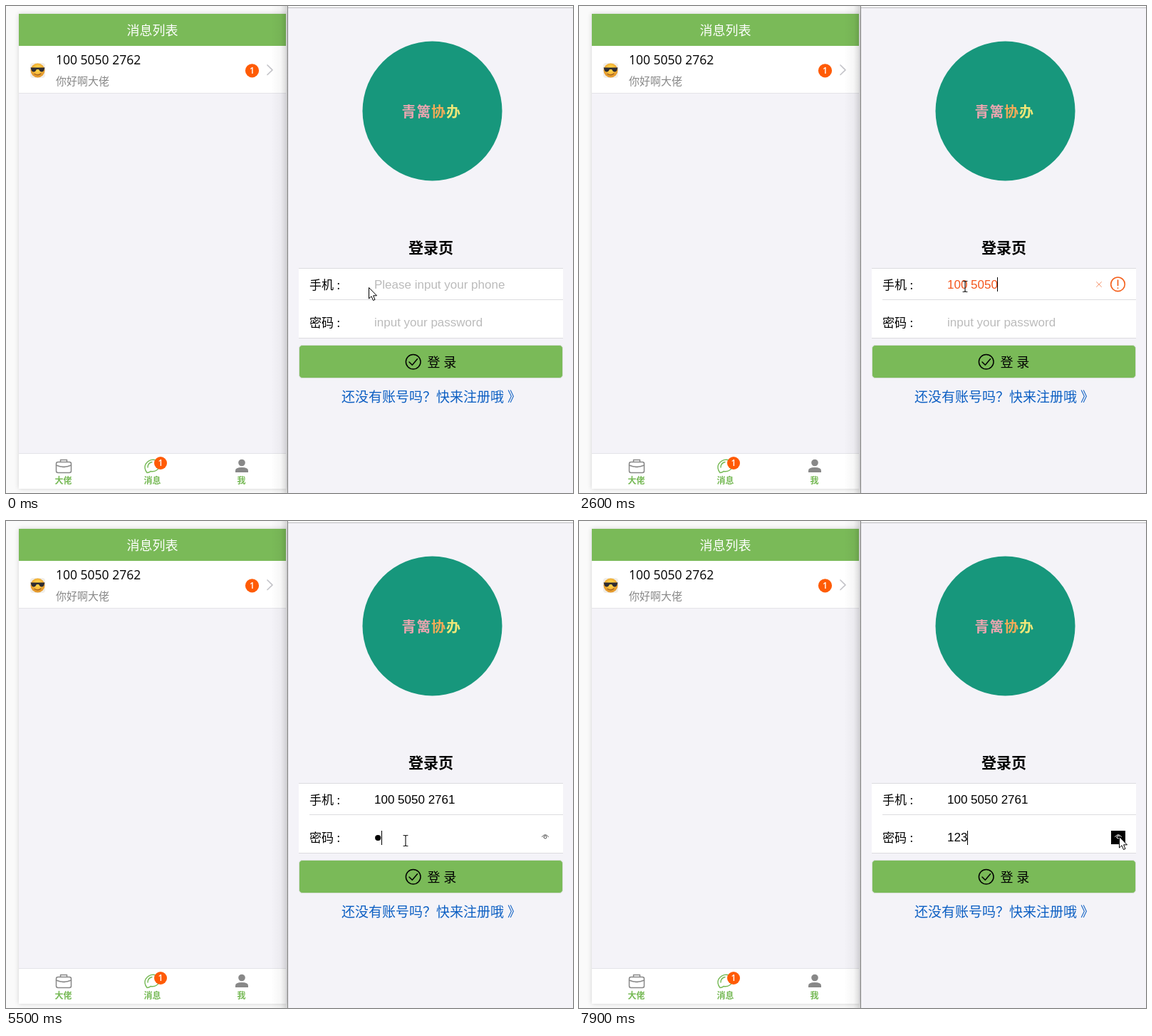
An HTML page that plays this animation: 796 px wide and 684 px high, repeating every 8 s.

```html
<!DOCTYPE html>
<html lang="zh-CN">
<head>
<meta charset="utf-8">
<title>登录页</title>
<style>
html, body { margin: 0; width: 100%; height: 100%; overflow: hidden; background: #fafafa; }
svg { display: block; width: 796px; height: 684px; }
text { font-family: "Open Sans", "Noto Sans CJK SC", "Noto Sans CJK", sans-serif; white-space: pre; }
.field { font: 17px "Liberation Sans", Arial, sans-serif; }
.hint { fill: #bbb; }
.mid { text-anchor: middle; }
.tab { font-size: 12px; font-weight: 700; fill: #76b955; }
.badge { font-size: 12px; fill: #fff; font-weight: 600; }
.line { fill: none; stroke-linecap: round; stroke-linejoin: round; }
</style>
</head>
<body>
<svg viewBox="0 0 796 684">
  <defs>
    <linearGradient id="shade">
      <stop offset="0" stop-opacity="0"/>
      <stop offset=".6" stop-opacity=".035"/>
      <stop offset="1" stop-opacity=".16"/>
    </linearGradient>
    <radialGradient id="face" cy=".4">
      <stop offset=".4" stop-color="#ffce45"/>
      <stop offset="1" stop-color="#e59a2c"/>
    </radialGradient>
    <filter id="soft" x="-10%" y="-10%" width="120%" height="120%">
      <feDropShadow dx="0" dy="0" stdDeviation="3" flood-opacity=".16"/>
    </filter>
  </defs>

  <!-- message list -->
  <rect width="796" height="684" fill="#fafafa"/>
  <rect x="18" y="11" width="376" height="667" fill="#f4f3f8" filter="url(#soft)"/>
  <rect x="18" y="11" width="375" height="45" fill="#7aba58"/>
  <text class="mid" x="205.5" y="41" font-size="18" fill="#fff">消息列表</text>
  <rect x="18" y="56" width="375" height="66.5" fill="#fff"/>
  <path d="M18 122.5H393M18 628.5H393" stroke="#e4e4e8"/>
  <rect x="34" y="80" width="21" height="21" rx="4" fill="#f1eee8"/>
  <circle cx="44.5" cy="90.5" r="10" fill="url(#face)"/>
  <path d="M34.5 86.5H54.5L53 91Q49 95 46 89H43Q40 95 36 91Z" fill="#2d2c33"/>
  <path class="line" d="M40 95.5Q45 98.5 49 95" stroke="#9a5a20" stroke-width="1.2"/>
  <text x="70" y="82" font-size="17.5">100 5050 2762</text>
  <text x="70" y="111" font-size="15" fill="#888">你好啊大佬</text>
  <circle cx="345.5" cy="90.8" r="9.6" fill="#ff5b05"/>
  <text class="badge mid" x="345.5" y="95.2">1</text>
  <path class="line" d="M367 83L374 89.8L367 96.5" stroke="#c4c4c9" stroke-width="1.7"/>

  <!-- tab bar -->
  <rect x="18" y="629" width="375" height="49" fill="#fff"/>
  <g class="line" stroke="#888" stroke-width="1.5">
    <rect x="70.5" y="640.5" width="21" height="15" rx="2.5"/>
    <path d="M76.5 640V637.5H85.5V640M70.5 645Q81 649.5 91.5 645M79 647.5H83"/>
  </g>
  <path class="line" d="M198 655.5Q193 649 196 643.5Q201 636 209 637.5Q217 640 215 648Q211 655 203 653.5Q201 655.5 198 655.5ZM199 648Q199 642 205 640.5" stroke="#76b955" stroke-width="1.4"/>
  <circle cx="217" cy="642" r="9" fill="#ff5b05"/>
  <text class="badge mid" x="217" y="646.3">1</text>
  <circle cx="331" cy="641.5" r="4.8" fill="#888"/>
  <path d="M322 655V652.5Q322 648 331 648T340 652.5V655Z" fill="#888"/>
  <text class="tab mid" x="80.5" y="670.7">大佬</text>
  <text class="tab mid" x="205.5" y="670.7">消息</text>
  <text class="tab mid" x="330.5" y="670.7">我</text>
  <rect x="372" width="23" height="684" fill="url(#shade)"/>

  <!-- login window -->
  <rect x="395" width="401" height="684" fill="#f4f3f8"/>
  <rect x="396" width="400" height="2" fill="#fafafa"/>
  <path d="M396 2.5H796" stroke="#bcbcbf"/>
  <path d="M395.5 0V684" stroke="#858585"/>
  <circle cx="598.5" cy="147.5" r="98" fill="#17977c"/>
  <text y="155.5" font-size="20" font-weight="700"><tspan x="555.5" fill="#eca5b0">青</tspan><tspan x="576.5" fill="#eca5b0">篱</tspan><tspan x="597" fill="#f4ab58">协</tspan><tspan x="618" fill="#efe778">办</tspan></text>
  <text class="mid" x="596.5" y="347" font-size="21" font-weight="700">登录页</text>
  <rect x="411" y="368" width="371" height="99" fill="#fff"/>
  <path d="M411 368.5H782M426 412.5H782M411 466.5H782" stroke="#dcdcdf"/>
  <text x="426" y="397.5" font-size="17">手机 :</text>
  <text x="426" y="450.5" font-size="17">密码 :</text>
  <rect x="411.5" y="476.5" width="370" height="46" rx="4.5" fill="#7aba58" stroke="#d5dfd3"/>
  <circle class="line" cx="571.7" cy="499.8" r="10.3" stroke="#000" stroke-width="1.5"/>
  <path class="line" d="M566 500L570.3 504.3L577.5 495.7" stroke="#000" stroke-width="1.5"/>
  <text x="591.5" y="506.5" font-size="18">登 录</text>
  <text x="471" y="556" font-size="19" fill="#0c5fc3">还没有账号吗？快来注册哦 》</text>

  <!-- live parts -->
  <text id="phone" class="field" x="517" y="397"></text>
  <text id="pass" class="field" x="517" y="450"></text>
  <g id="dots"><circle cx="522.2" cy="445" r="4.1"/><circle cx="532.5" cy="445" r="4.1"/><circle cx="542.8" cy="445" r="4.1"/></g>
  <path id="clear" class="line" d="M-3.5 -3.5L3.5 3.5M3.5 -3.5L-3.5 3.5"/>
  <g id="error">
    <circle class="line" cx="756.5" cy="390.8" r="9.8" stroke="#f4611d" stroke-width="1.6"/>
    <path class="line" d="M756.5 385V392.5M756.5 396V396.3" stroke="#f4611d" stroke-width="1.7"/>
  </g>
  <g id="eye">
    <rect id="eyeBox" x="747" y="435" width="20" height="19"/>
    <path id="eyeLine" class="line" d="M752.5 443.5Q757 437.5 761.5 443.5M755 444A2 2 0 1 0 759 444A2 2 0 1 0 755 444"/>
  </g>
  <path id="caret" d="M0 0V20" stroke="#000"/>
  <path id="arrow" d="M.5 .5V16L4 12.7L6.5 18.5L9 17.4L6.6 11.8H11.5Z" fill="#fff" stroke="#000"/>
  <path id="beam" class="line" d="M-3 -7.5H-1L0 -6.5L1 -7.5H3M0 -6.5V6.5M-3 7.5H-1L0 6.5L1 7.5H3" stroke="#222" stroke-width="1.2"/>
</svg>
<script>
const $ = id => document.getElementById(id);
const LOOP = 8000, BLINK = 530;
const number = "10050502761", secret = "123";
const phoneKeys = [1300, 1500, 1700, 1900, 2100, 2300, 2500, 2900, 3200, 3500, 3700];
const passKeys = [5500, 5650, 5800];
const focusPhone = 600, focusPass = 4700, reveal = 7600;
const resets = [focusPhone, ...phoneKeys, focusPass, ...passKeys, reveal];
const path = [
  [0, 509, 395], [100, 509, 395], [400, 542, 394], [4100, 542, 394], [4500, 561, 449],
  [6500, 561, 449], [6900, 662, 472], [7150, 705, 484], [7450, 758, 443], [8000, 758, 443]
];

const show = (id, on) => $(id).style.display = on ? "" : "none";
const place = (id, x, y) => $(id).setAttribute("transform", `translate(${x} ${y})`);
const count = (keys, t) => keys.filter(k => k <= t).length;
const format = s => [s.slice(0, 3), s.slice(3, 7), s.slice(7)].filter(Boolean).join(" ");

function mouse(t) {
  const i = path.findIndex(p => p[0] > t);
  const [t0, x0, y0] = path[i - 1], [t1, x1, y1] = path[i];
  const u = (t - t0) / (t1 - t0);
  return [x0 + (x1 - x0) * u, y0 + (y1 - y0) * u];
}

function fill(id, value, hint, color) {
  const el = $(id);
  if (el.textContent !== (value || hint)) el.textContent = value || hint;
  el.classList.toggle("hint", !value);
  el.style.fill = value ? color : "";
}

function draw(t) {
  const digits = count(phoneKeys, t), typed = count(passKeys, t);
  const onPass = t >= focusPass, open = t >= reveal;
  const bad = digits > 0 && digits < number.length;

  fill("phone", format(number.slice(0, digits)), "Please input your phone", bad ? "#f4561d" : "#000");
  fill("pass", open ? secret : "", typed ? "" : "input your password", "#000");
  [...$("dots").children].forEach((dot, i) => dot.style.display = !open && i < typed ? "" : "none");

  show("error", bad);
  show("clear", digits && !onPass);
  place("clear", bad ? 730 : 757, 391);
  $("clear").style.stroke = bad ? "#f59a75" : "#777";
  show("eye", onPass);
  show("eyeBox", open);
  $("eyeLine").style.stroke = open ? "#fff" : "#555";

  const last = Math.max(...resets.filter(k => k <= t));
  show("caret", t >= focusPhone && Math.floor((t - last) / BLINK) % 2 === 0);
  const width = onPass
    ? (open ? $("pass").getComputedTextLength() : typed * 10.3)
    : (digits ? $("phone").getComputedTextLength() : 0);
  place("caret", Math.floor(517 + width) + .5, onPass ? 435 : 381);

  const [x, y] = mouse(t);
  const inField = x >= 517 && x < 745 && (y > 372 && y < 410 || y > 425 && y < 463);
  show("beam", inField);
  show("arrow", !inField);
  place(inField ? "beam" : "arrow", x, y);
}

const start = performance.now();
function tick() {
  draw((performance.now() - start) % LOOP);
  requestAnimationFrame(tick);
}
tick();
</script>
</body>
</html>
```
